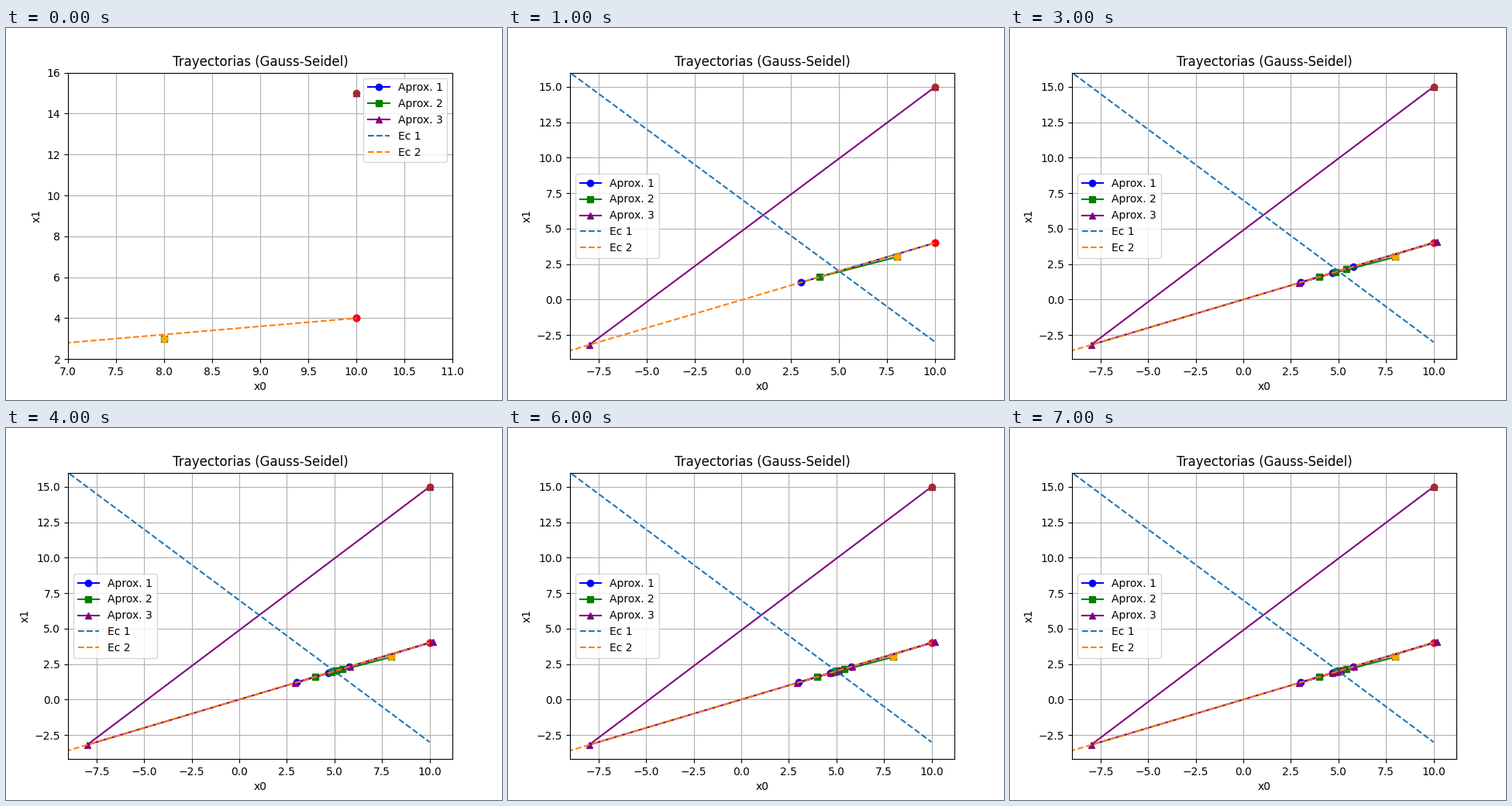
These frames come from a looping animation (640x480 px, 8 s). A matplotlib script:

```python
import numpy as np
import matplotlib.pyplot as plt
from matplotlib.animation import FuncAnimation

STEPS = 8

# start point, line colour, marker, colour of the start dot
RUNS = [
    ((10, 4), "blue", "o", "red"),
    ((8, 3), "green", "s", "orange"),
    ((10, 15), "purple", "^", "brown"),
]


def gauss_seidel(start, steps):
    """Iterate x0 = 7 - x1, x1 = 0.4 * x0."""
    points = [start]
    for _ in range(steps):
        x0 = 7 - points[-1][1]
        points.append((x0, 0.4 * x0))
    return np.array(points, dtype=float)


paths = [gauss_seidel(run[0], STEPS - 1) for run in RUNS]
xs = np.linspace(-10, 10, 100)

fig, ax = plt.subplots(figsize=(6.4, 4.8), dpi=100)


def draw(step):
    ax.clear()
    for i, (path, (_, color, marker, dot)) in enumerate(zip(paths, RUNS), 1):
        shown = path[:step + 1]
        ax.plot(shown[:, 0], shown[:, 1], marker=marker, color=color,
                label=f"Aprox. {i}")
        ax.plot(*path[0], "o", color=dot)
    ax.plot(xs, 7 - xs, "--", color="tab:blue", label="Ec 1")
    ax.plot(xs, 0.4 * xs, "--", color="tab:orange", label="Ec 2")

    visible = np.vstack([path[:step + 1] for path in paths])
    low, high = visible.min(axis=0) - 1, visible.max(axis=0) + 1
    ax.set_xlim(low[0], high[0])
    ax.set_ylim(low[1], high[1])
    ax.set_title("Trayectorias (Gauss-Seidel)")
    ax.set_xlabel("x0")
    ax.set_ylabel("x1")
    ax.grid(True)
    ax.legend(loc="upper right" if step == 0 else "center left")
    return []


anim = FuncAnimation(fig, draw, frames=STEPS, init_func=lambda: [],
                     interval=1000, repeat=True, repeat_delay=0)
plt.show()
```
